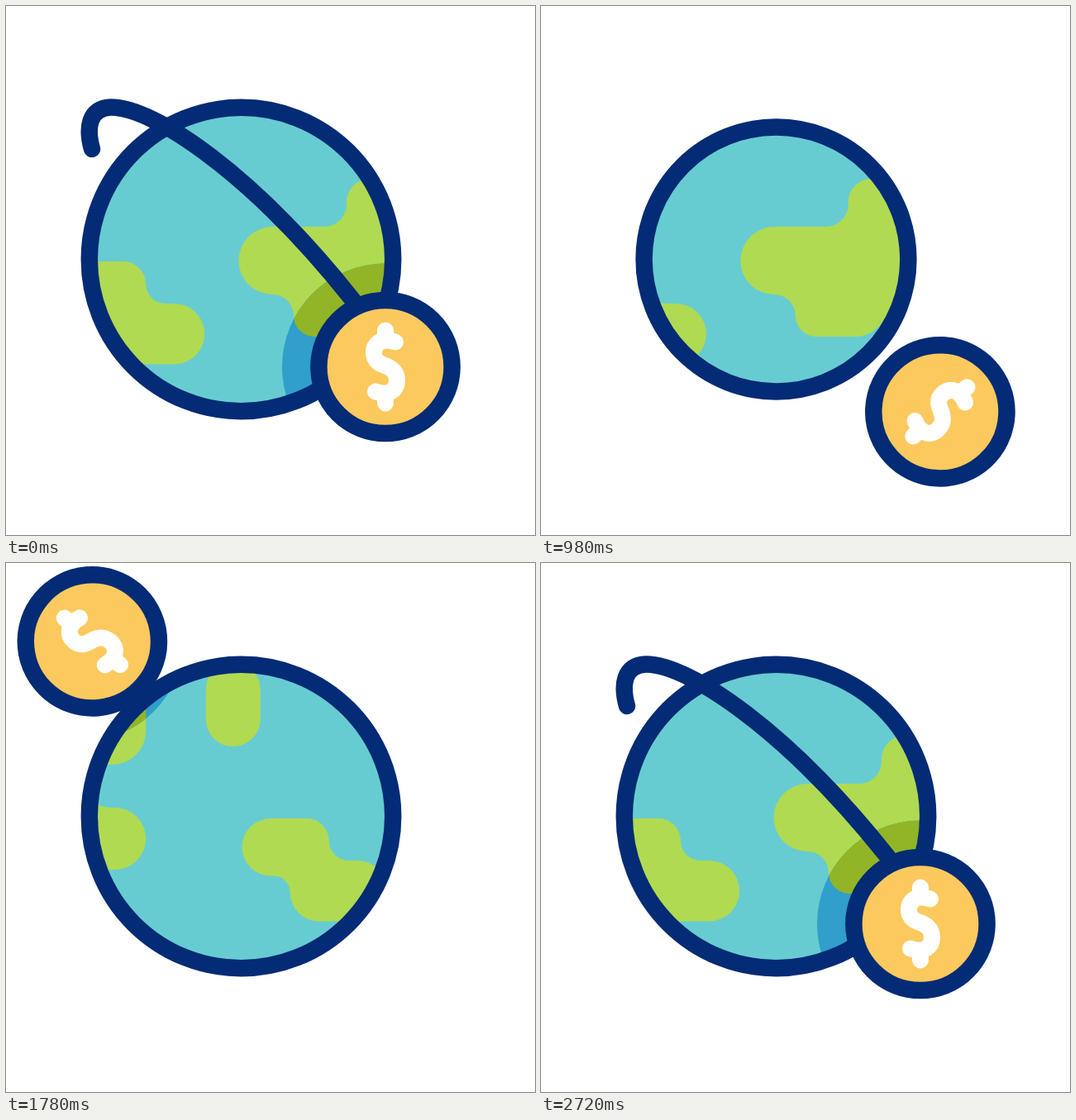
These frames come from a looping animation (640 by 640 pixels, 3 s). An HTML page:

```html
<!DOCTYPE html>
<html lang="en">
<head>
<meta charset="utf-8">
<title>Coin around the globe</title>
<style>
html, body { margin: 0; width: 100%; height: 100%; overflow: hidden; background: #fff; }
svg { display: block; width: 100vw; height: 100vh; }
.line { fill: none; stroke: #042b75; stroke-width: 20.5; stroke-linecap: round; stroke-linejoin: round; }
</style>
</head>
<body>
<svg viewBox="0 0 640 640">
  <defs>
    <g id="land">
      <path d="M98.5 309H142a27 27 0 0 1 27 27a24 24 0 0 0 24 24H203.500a36.700 36.700 0 0 1 0 73.400H157a35 35 0 0 1-35-35a20 20 0 0 0-20-20H98.500a34.700 34.700 0 0 1 0-69.400z"/>
      <path d="M322.500 267H385a27 27 0 0 0 27-27V237a28 28 0 0 1 28-28a31.500 31.500 0 0 0 31.500-31.500V172a39 39 0 0 1 78 0V203a41 41 0 0 1-41 41H506a26 26 0 0 0 0 52H512a37.500 37.500 0 0 1 0 75H482c-32 0-30 29-62 29H373.500a25.500 25.500 0 0 1-25.500-25.500a25.500 25.500 0 0 0-25.500-25.500a41 41 0 0 1 0-82z"/>
      <rect x="20" y="120" width="66" height="102" rx="33"/>
    </g>
    <g id="map">
      <use href="#land"/>
      <use href="#land" x="602"/>
    </g>
    <clipPath id="disc"><circle id="discShape" cx="284.5" cy="306.5"/></clipPath>
    <clipPath id="shade"><circle id="shadeShape" r="125"/></clipPath>
  </defs>
  <g id="back"></g>
  <g clip-path="url(#disc)">
    <rect width="640" height="640" fill="#67ccd1"/>
    <use class="map" href="#map" fill="#b0da52"/>
    <g id="shadow" clip-path="url(#shade)">
      <rect width="640" height="640" fill="#309fca"/>
      <use class="map" href="#map" fill="#91b526"/>
    </g>
  </g>
  <circle id="rim" class="line" cx="284.5" cy="306.5"/>
  <path id="trail" class="line" d="M104 173C97 148 100 123 127 122.500C180 122.500 300 205 419 355Q461 408 490 460"/>
  <g id="front">
    <g id="coin">
      <circle class="line" r="80.6" style="fill:#fbc95d"/>
      <path d="M0-44V-34M12-30C-4-36-14-28-14-17C-14-6-5-3 1-1C8 2 14 6 14 17C14 28 4 36-12 30M0 34V44"
        fill="none" stroke="#fff" stroke-width="20" stroke-linecap="round" stroke-linejoin="round"/>
    </g>
  </g>
</svg>
<script>
const LOOP = 3000, AWAY = 850, RETURN = 1730;
const $ = id => document.getElementById(id);

// Smooth curve through [time, value] steps that never overshoots them.
function curve(...keys) {
  const rate = i => (keys[i + 1][1] - keys[i][1]) / (keys[i + 1][0] - keys[i][0]);
  const slope = keys.map((k, i) => {
    if (i === 0 || i === keys.length - 1) return 0;
    const a = rate(i - 1), b = rate(i);
    return a * b > 0 ? 2 * a * b / (a + b) : 0;
  });
  return t => {
    if (t <= keys[0][0]) return keys[0][1];
    const i = keys.findIndex(k => k[0] > t) - 1;
    if (i < 0) return keys[keys.length - 1][1];
    const [t0, v0] = keys[i], [t1, v1] = keys[i + 1];
    const h = t1 - t0, p = (t - t0) / h, q = 1 - p;
    return q * q * (1 + 2 * p) * v0 + p * p * (3 - 2 * p) * v1
      + h * p * q * (q * slope[i] - p * slope[i + 1]);
  };
}

const coinX = curve([200, 459], [620, 480], [720, 485], [AWAY, 491], [980, 483], [1280, 300],
  [1520, 156.5], [1690, 94], [1740, 96], [1820, 118], [2040, 232.5], [2380, 393.5], [2720, 459]);
const coinY = curve([200, 436.5], [620, 481.5], [720, 494], [AWAY, 505], [980, 491], [1280, 285],
  [1520, 131.5], [1690, 95], [1740, 93], [1820, 99], [2040, 167], [2380, 340.5], [2720, 436.5]);
const turn = curve([200, 0], [620, 46], [AWAY, 50], [980, 47.7], [1280, 0],
  [1520, -38], [1780, -50], [2040, -48], [2380, -17.6], [2720, 0]);
const scroll = curve([200, 0], [400, 21], [540, 27], [620, 25], [980, -40],
  [1520, -260], [2040, -489], [2380, -584], [2720, -602]);
const shadeX = curve([200, 0], [620, 3], [AWAY, 5], [RETURN, -14], [2040, -9], [2380, 2], [2720, 0]);
const shadeY = curve([200, 0], [620, 5], [AWAY, 8], [RETURN, -4], [2040, 1], [2380, 4.5], [2720, 0]);
const grow = curve([1740, 0], [1820, 6], [2040, 32], [2380, 70], [2720, 100]);

const ramp = (t, a, b) => Math.min(1, Math.max(0, (t - a) / (b - a)));
const trailLength = $("trail").getTotalLength();
const maps = document.querySelectorAll(".map");

function drawTrail(t) {
  const from = t < RETURN ? (t < 620 ? 0.588 * ramp(t, 200, 620) : 0.588 + 0.412 * ramp(t, 620, 880)) : 0;
  const to = t < RETURN ? 1 : grow(t) / 100;
  const size = (to - from) * trailLength;
  const trail = $("trail");
  trail.style.display = size > 0.5 ? "" : "none";
  trail.setAttribute("stroke-dasharray", `0 ${from * trailLength} ${size} 2000`);
  trail.style.strokeLinecap = "round";
  // A zero-length first dash would leave a dot at the start, so shift the pattern instead.
  trail.setAttribute("stroke-dasharray", `${size} 2000`);
  trail.setAttribute("stroke-dashoffset", -from * trailLength);
}

function draw(t) {
  const x = coinX(t), y = coinY(t);
  const behind = t >= AWAY && t < RETURN;
  const shrink = 24 * (ramp(t, 200, 975) - ramp(t, 975, 1747));

  $("rim").setAttribute("r", 183.7 - shrink);
  $("discShape").setAttribute("r", 183.7 - shrink);
  for (const map of maps) map.setAttribute("x", scroll(t));

  const layer = $(behind ? "back" : "front"), coin = $("coin");
  if (coin.parentNode !== layer) layer.appendChild(coin);
  coin.setAttribute("transform", `translate(${x} ${y}) rotate(${turn(t)})`);

  $("shadow").style.display = behind ? "none" : "";
  $("shadeShape").setAttribute("cx", x + shadeX(t));
  $("shadeShape").setAttribute("cy", y + shadeY(t));
  drawTrail(t);
}

const start = performance.now();
function tick() {
  draw((performance.now() - start) % LOOP);
  requestAnimationFrame(tick);
}
tick();
</script>
</body>
</html>
```
